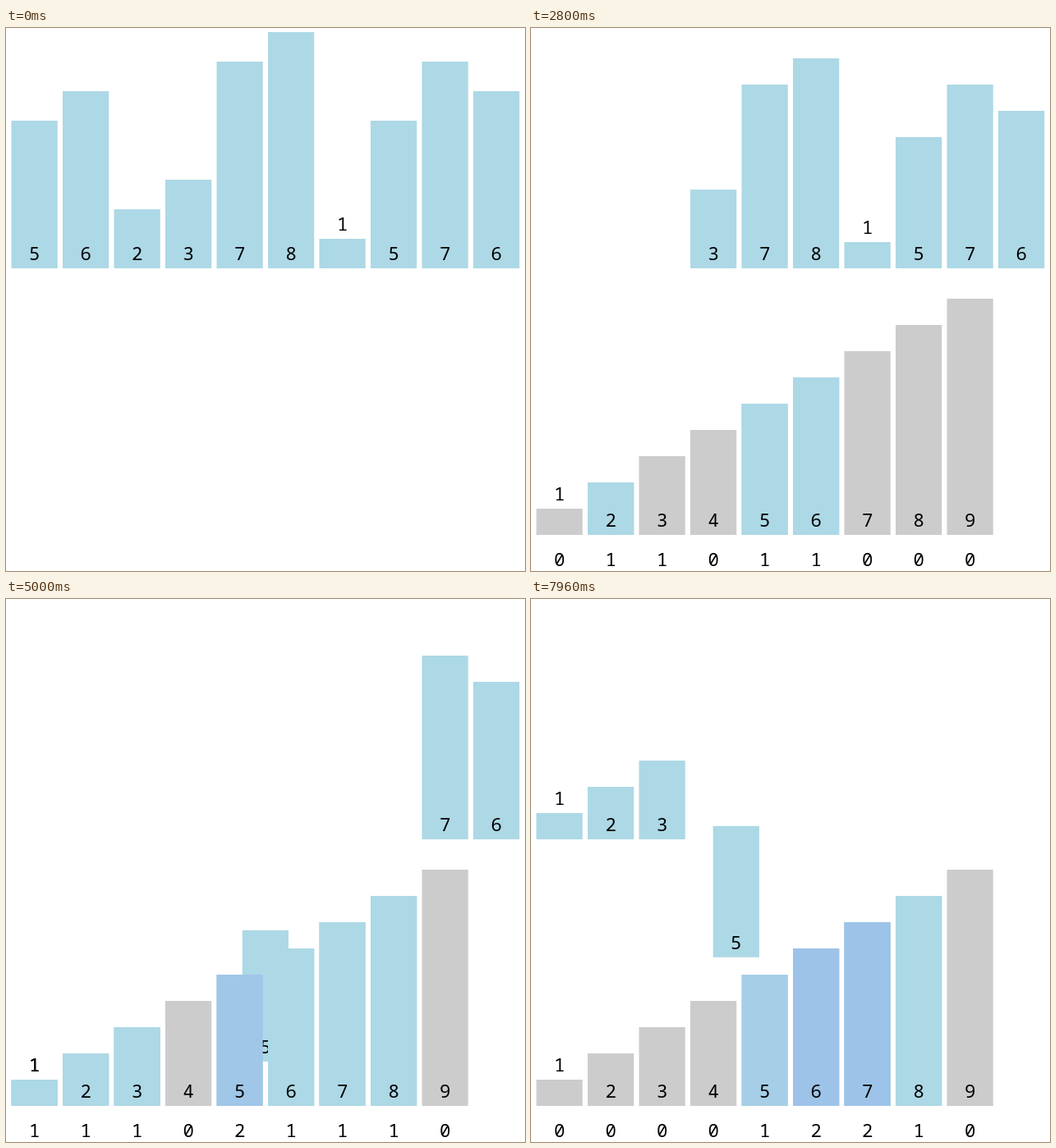
An HTML page for the animation above (8000 ms loop, 632 by 662 pixels).

```html
<!DOCTYPE html>
<html lang="en">
<head>
<meta charset="utf-8">
<title>Counting sort</title>
<style>
  html, body { margin: 0; width: 100%; height: 100%; overflow: hidden; background: #fff; }
  svg { display: block; width: 100%; height: 100%; }
  text { font: 22.4px "Noto Sans Mono", "DejaVu Sans Mono", monospace; text-anchor: middle; fill: #000; }
</style>
</head>
<body>
<svg id="stage" viewBox="0 0 632 662"></svg>
<script>
const LOOP = 8000, TICK = 40, STEP = 500;
const FIRST_LABEL = 775, FIRST_MOVE = 804, MOVE_TIME = 300;
const LEFT = 6.5, PITCH = 62.5, WIDTH = 56.25;
const TOP_BASE = 293, LOW_BASE = 618, COUNT_Y = 656;
const SHADES = [[204, 204, 204], [173, 216, 230], [157, 195, 232]];

const values = [5, 6, 2, 3, 7, 8, 1, 5, 7, 6];
const returning = [6, 2, 3, 0];
const moves = [
  ...values.map((v, bar) => ({ bar, slot: v - 1, base: LOW_BASE, bin: v - 1, change: 1 })),
  ...returning.map((bar, slot) => ({ bar, slot, base: TOP_BASE, bin: values[bar] - 1, change: -1 }))
];

const stage = document.getElementById("stage");

function add(parent, tag, attrs = {}) {
  const el = document.createElementNS("http://www.w3.org/2000/svg", tag);
  set(el, attrs);
  return parent.appendChild(el);
}

function set(el, attrs) {
  for (const name in attrs) el.setAttribute(name, attrs[name]);
}

function makeBar(parent, value) {
  const g = add(parent, "g");
  const rect = add(g, "rect", { fill: "#add8e6" });
  const label = add(g, "text", { x: WIDTH / 2 });
  label.textContent = value;
  return { g, rect, label, value };
}

const slotX = slot => LEFT + PITCH * slot;
const mix = (a, b, p) => a + (b - a) * p;

function placeBar(bar, x, base, unit, grow = 1) {
  const h = bar.value * unit;
  set(bar.g, { transform: `translate(${x} ${base - h})` });
  set(bar.rect, { width: WIDTH * grow, height: h * grow });
  set(bar.label, { y: bar.value === 1 ? -10 : h - 10 });
}

const bars = values.map(v => makeBar(stage, v));
const lower = add(stage, "g");
const bins = Array.from({ length: 9 }, (_, i) => {
  const bin = makeBar(lower, i + 1);
  bin.count = add(lower, "text", { x: slotX(i) + WIDTH / 2, y: COUNT_Y });
  return bin;
});

// Cubic in-out, settled once the rest is below a pixel
function progress(t, phase) {
  const p = (t - FIRST_MOVE - phase * STEP) / MOVE_TIME;
  if (p <= 0) return 0;
  if (p >= 0.9) return 1;
  return p < 0.5 ? 4 * p ** 3 : 1 - 4 * (1 - p) ** 3;
}

function render(time) {
  const t = Math.floor(time % LOOP / TICK) * TICK;
  const grow = progress(t, 0);
  const places = values.map((_, i) => ({ x: slotX(i), base: TOP_BASE }));
  const counts = bins.map(() => 0);
  const fills = bins.map(() => SHADES[0]);

  moves.forEach((m, i) => {
    if (t < FIRST_LABEL + (i + 1) * STEP) return;
    const p = progress(t, i + 1);
    const place = places[m.bar];
    place.x = mix(place.x, slotX(m.slot), p);
    place.base = mix(place.base, m.base, p);
    counts[m.bin] += m.change;
    const goal = SHADES[counts[m.bin]];
    fills[m.bin] = fills[m.bin].map((c, k) => mix(c, goal[k], p));
  });

  bars.forEach((bar, i) => placeBar(bar, places[i].x, places[i].base, mix(36, 32, grow)));
  set(lower, { visibility: t < FIRST_LABEL ? "hidden" : "visible" });
  bins.forEach((bin, i) => {
    placeBar(bin, slotX(i), LOW_BASE, 32, grow);
    set(bin.rect, { fill: `rgb(${fills[i].map(Math.round)})` });
    bin.count.textContent = counts[i];
  });
}

const start = performance.now();
function frame() {
  render(performance.now() - start);
  requestAnimationFrame(frame);
}
frame();
</script>
</body>
</html>
```
